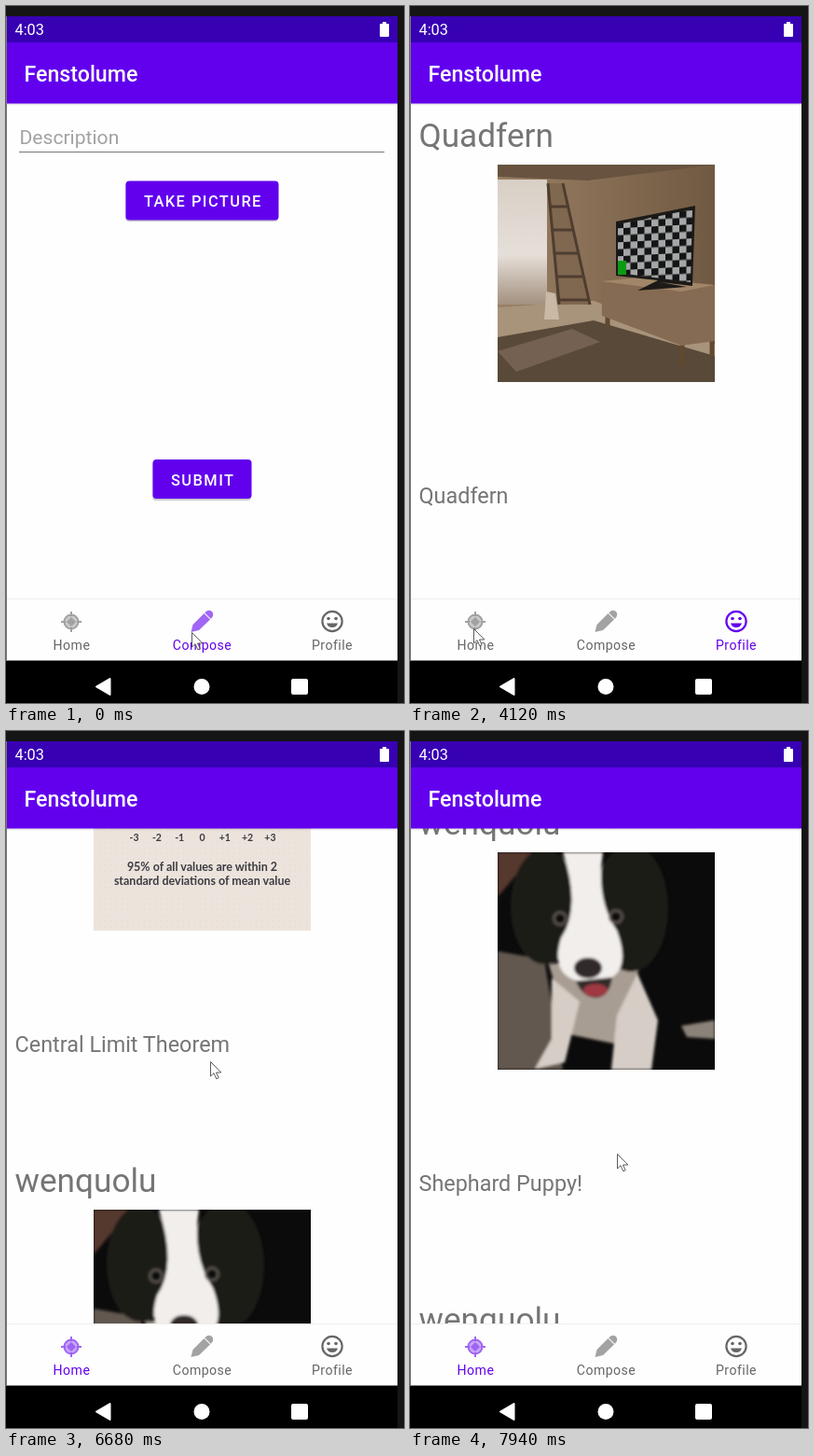
Recreate the animation shown at these times as an HTML page. Size 427 by 747 pixels, loop 8 s.

```html
<!DOCTYPE html>
<html lang="en">
<head>
<meta charset="utf-8">
<title>Photo sharing app</title>
<style>
html, body { margin: 0; width: 100%; height: 100%; overflow: hidden; background: #000; }
#stage { display: block; width: 100vw; height: 100vh; font-family: Roboto, sans-serif; }
.name { font-size: 35.2px; fill: #757575; }
.caption { font-size: 23.4px; fill: #757575; }
.button { font-size: 16.4px; font-weight: 500; letter-spacing: 1.46px; fill: #fff; }
.tab { color: #666; fill: currentColor; }
.tab.on { color: #6200ee; }
.tab text { font-size: 14.1px; letter-spacing: .46px; text-anchor: middle; }
.chart { font-family: Lato, sans-serif; font-weight: 700; text-anchor: middle; fill: #3b3b43; }
</style>
</head>
<body>
<svg id="stage" viewBox="0 0 427 747">
  <defs>
    <clipPath id="barClip"><path d="M1 636H420V701.5H1z"/></clipPath>
    <filter id="soft"><feGaussianBlur stdDeviation="1.6"/></filter>
    <linearGradient id="drop" x2="0" y2="1">
      <stop stop-opacity=".15"/><stop offset="1" stop-opacity="0"/>
    </linearGradient>
    <linearGradient id="daylight" x2="0" y2="1">
      <stop stop-color="#d8cfc5"/><stop offset=".6" stop-color="#e6dfd9"/><stop offset="1" stop-color="#a3917e"/>
    </linearGradient>
    <linearGradient id="wood"><stop stop-color="#9a8064"/><stop offset="1" stop-color="#705942"/></linearGradient>
    <pattern id="checks" width="15" height="15" patternUnits="userSpaceOnUse" patternTransform="skewY(-3)">
      <path fill="#a4a6a8" d="M0 0H15V15H0z"/>
      <path fill="#151515" d="M0 0H7.5V15H15V7.5H0z"/>
    </pattern>
    <pattern id="grid" width="6" height="6" patternUnits="userSpaceOnUse">
      <path fill="#e2d6cc" d="M0 0h1v1H0z"/>
    </pattern>

    <g id="room">
      <path fill="url(#wood)" d="M0 0H233V233H0z"/>
      <path fill="#67533f" d="M0 0H233L97 17 0 13z"/>
      <path fill="url(#daylight)" d="M0 16H53V150H0z"/>
      <path fill="#a8937b" d="M0 153 103 146 233 192V233H0z"/>
      <path fill="#594939" d="M0 185 103 167 233 205V233H0z"/>
      <path fill="#746151" d="M0 200 80 176 110 190 20 222z"/>
      <path fill="#80674f" d="M54 20H70L99 150H66z"/>
      <path id="shelves" fill="none" stroke="#4e3d30" stroke-width="3"/>
      <path fill="#c9b9a5" d="M50 166 52 136 62 138 66 166z"/>
      <path fill="none" stroke="#60492f" stroke-width="5" d="M118 159V176M198 190V216M230 186V206"/>
      <path fill="#866b54" d="M111 125 151 121 233 129V189L197 194 112 162z"/>
      <path fill="#a18668" d="M111 125 151 121 233 129 197 136z"/>
      <path fill="#1c1a18" d="M127 61 212 44 209 130 174 126 203 131 150 135 172 124 127 119z"/>
      <path fill="url(#checks)" d="M129 64 209 48 207 126 129 116z"/>
      <path fill="#0b9b13" d="M129 103H138V118H129z"/>
    </g>

    <g id="bell">
      <path fill="#ece4dc" d="M0 0H233V233H0z"/>
      <path fill="url(#grid)" d="M0 0H233V233H0z"/>
      <path id="area" fill="#3952a4"/>
      <path id="curve" fill="none" stroke="#3952a4"/>
      <path stroke="#dce0ee" d="M92 71V119M116.5 41V119M141 71V119"/>
      <path stroke="#45434a" stroke-width="1.4" d="M25 119H209"/>
      <g id="ticks" class="chart" font-size="10.5"></g>
      <text class="chart" x="116" y="32" font-size="12" style="fill:#3952a4">95%</text>
      <g class="chart" font-size="12.5">
        <text x="116.5" y="169">95% of all values are within 2</text>
        <text x="116.5" y="184">standard deviations of mean value</text>
      </g>
    </g>

    <g id="puppy">
      <path fill="#0c0b0b" d="M0 0H233V233H0z"/>
      <g filter="url(#soft)">
        <path fill="#54392d" d="M0 0H40L0 48z"/>
        <path fill="#62594f" d="M0 106 50 115 70 233H0z"/>
        <path fill="#8b8279" d="M197 186 233 180V200L203 198z"/>
        <path fill="#a89d92" d="M55 120 150 110 152 190 125 205 76 195z"/>
        <path fill="#d6cec6" d="M58 135 88 160 72 225 40 232 58 200zM150 130 128 175 122 233H165L172 180z"/>
        <ellipse cx="50" cy="58" rx="36" ry="62" fill="#1d1a18"/>
        <ellipse cx="143" cy="60" rx="40" ry="68" fill="#1d1a18"/>
        <path fill="#f1eeeb" d="M70 0H113Q105 50 128 84 148 138 100 140 54 138 68 92 90 60 70 0z"/>
        <g fill="#57504a"><circle cx="67" cy="71" r="8"/><circle cx="127" cy="69" r="8"/></g>
        <g fill="#080808"><circle cx="67" cy="71" r="5"/><circle cx="127" cy="69" r="5"/></g>
        <ellipse cx="97" cy="124" rx="15" ry="11" fill="#302a2a"/>
        <path fill="#302a2a" d="M84 138 123 134Q120 156 104 156 90 154 84 138z"/>
        <ellipse cx="105" cy="148" rx="13" ry="7" fill="#a03942"/>
      </g>
    </g>
  </defs>

  <path fill="#fefefe" d="M0 104H420V701H0z"/>
  <g id="compose">
    <text x="14.5" y="148" font-size="21.1" fill="#a2a2a2">Description</text>
    <path stroke="#777" d="M14 156.5H406"/>
    <g fill="#0003"><rect x="128" y="189" width="164" height="42" rx="4"/><rect x="157" y="488" width="106" height="42" rx="4"/></g>
    <g fill="#6200ee"><rect x="128.5" y="187.5" width="164" height="42" rx="4"/><rect x="157.5" y="486" width="106" height="42" rx="4"/></g>
    <text class="button" x="148" y="215">TAKE PICTURE</text>
    <text class="button" x="177" y="513.5">SUBMIT</text>
  </g>
  <g id="profile"></g>
  <g id="home"></g>

  <path fill="#151515" d="M0 0H427V747H420V11H0z"/>
  <path fill="#3700b3" d="M0 11H420V39H0z"/>
  <path fill="url(#drop)" d="M0 104H420V107H0z"/>
  <path fill="#6200ee" d="M0 39H420V104.400H0z"/>
  <text x="9.5" y="31" font-size="16.3" fill="#fff">4:03</text>
  <path fill="#fff" d="M404 17h4v2h2q1 0 1 1v12q0 1-1 1h-8q-1 0-1-1V20q0-1 1-1h2z"/>
  <text x="19.5" y="81" font-size="23.2" font-weight="500" fill="#fff">Fenstolume</text>

  <path fill="#fefefe" d="M0 636H420V702H0z"/>
  <path stroke="#eee" d="M0 635.5H420"/>
  <circle id="ripple" cy="668" fill="#d6d6d6" clip-path="url(#barClip)"/>
  <g class="tab" id="homeTab">
    <g transform="translate(70 660)">
      <g opacity=".6">
        <circle r="7.5" fill="none" stroke="currentColor" stroke-width="2"/>
        <path stroke="currentColor" stroke-width="2" d="M0-11V-6M0 6V11M-11 0H-6M6 0H11"/>
      </g>
      <circle r="6.5" opacity=".35"/>
      <path opacity=".4" d="M0-5 5 0 0 5-5 0z"/>
    </g>
    <text x="70.5" y="690">Home</text>
  </g>
  <g class="tab" id="composeTab">
    <path opacity=".6" d="M198.5 671 200.500 663 212.500 651 219 657.500 207 669zM213.200 650.300 215 648.700Q218 646.500 221 649 223.500 652 221 655.500L219.700 656.800z"/>
    <text x="210.5" y="690">Compose</text>
  </g>
  <g class="tab" id="profileTab">
    <circle cx="350" cy="659.5" r="10.6" fill="none" stroke="currentColor" stroke-width="2.2"/>
    <circle cx="346" cy="656.5" r="1.8"/><circle cx="354" cy="656.5" r="1.8"/>
    <path d="M344 661.5H356Q354.500 666 350 666T344 661.500z"/>
    <text x="350" y="690">Profile</text>
  </g>

  <path d="M0 701.5H420V747H0z"/>
  <path stroke="#777" d="M.5 11V701.5"/>
  <path fill="#fff" stroke="#fff" stroke-linejoin="round" stroke-width="2" d="M97 729.500 111.500 721V738z"/>
  <circle cx="210" cy="729.5" r="8.5" fill="#fff"/>
  <rect x="306" y="721" width="18" height="17" rx="2" fill="#fff"/>
  <path id="cursor" fill="#fff" stroke="#333" stroke-width=".8" d="M.5.5V16L4 12.700 6.800 18.800 9.200 17.700 6.500 12H11.800z"/>
</svg>
<script>
const $ = id => document.getElementById(id);
const LOOP = 8000, FRAME = 120, PITCH = 532;

const post = (name, caption, photo, row = 0) => `<g transform="translate(0 ${row * PITCH})">
  <text class="name" x="9.5" y="151">${name}</text>
  <svg x="94" y="170" width="233" height="233"><use href="#${photo}"/></svg>
  <text class="caption" x="9.5" y="533">${caption}</text></g>`;

$('profile').innerHTML = post('Quadfern', 'Quadfern', 'room');
$('home').innerHTML = post('Heku', 'Central Limit Theorem', 'bell') +
  [1, 2].map(row => post('wenquolu', 'Shephard Puppy!', 'puppy', row)).join('');

let shelves = 'M54 20 66 150M70 20 99 150';
for (let i = 0; i < 5; i++) shelves += `M${57 + i * 2.5} ${45 + i * 25}h${18 + i * 3}`;
$('shelves').setAttribute('d', shelves);

// Normal curve, in units of one standard deviation
const MEAN = 116.5, UNIT = 24.3;
function bell(from, to) {
  const points = [];
  for (let z = from; z <= to + .01; z += .1)
    points.push(`${MEAN + z * UNIT} ${119 - 78 * Math.exp(-z * z / 2)}`);
  return 'M' + points.join('L');
}
$('curve').setAttribute('d', bell(-3.1, 3.1));
$('area').setAttribute('d', `${bell(-2, 2)}V119H${MEAN - 2 * UNIT}z`);
for (let z = -3; z <= 3; z++) {
  const x = MEAN + z * UNIT;
  $('ticks').innerHTML += `<path stroke="#45434a" d="M${x} 119v4"/><text x="${x}" y="137">${z > 0 ? '+' + z : z}</text>`;
}

// Each move: start time, number of steps, where it ends
const pointer = [
  [0, 1, 199, 671], [550, 3, 378, 669], [1080, 1, 372, 671], [1600, 4, 70, 682],
  [2110, 2, 333, 679], [3610, 4, 72, 668], [4120, 1, 68, 667], [5250, 2, 229, 459],
  [5650, 3, 224, 553], [6140, 2, 219, 472], [6410, 2, 219, 354], [7430, 2, 222, 560],
  [7700, 2, 222, 453]
];
const flings = [[0, 1, 0], [6410, 8, 310], [7700, 3, 572]];
const taps = [
  { tab: 'compose', press: -LOOP, open: 0, load: 0, x: 210 },
  { tab: 'profile', press: 2480, open: 2600, load: 2750, x: 350 },
  { tab: 'home', press: 4820, open: 4950, load: 5250, x: 70 }
];

const linear = p => p;
const easeOut = p => 1 - (1 - p) ** 2;

function travel(moves, t, ease) {
  const i = moves.findLastIndex(([start]) => start <= t);
  const [start, steps, ...end] = moves[i];
  const from = moves[Math.max(i - 1, 0)].slice(2);
  const p = ease(Math.min(1, (Math.floor((t - start) / FRAME) + 1) / steps));
  return end.map((v, k) => from[k] + (v - from[k]) * p);
}

function draw(t) {
  const [x, y] = travel(pointer, t, linear);
  const [offset] = travel(flings, t, easeOut);
  const active = taps.findLast(tap => tap.open <= t);
  const pressed = taps.findLast(tap => tap.press <= t);
  const age = t - pressed.press;

  for (const { tab, load } of taps) {
    const on = tab === active.tab;
    $(tab).style.display = on && t >= load ? '' : 'none';
    $(tab + 'Tab').classList.toggle('on', on);
  }
  $('home').setAttribute('transform', `translate(0 ${-offset})`);
  $('cursor').setAttribute('transform', `translate(${x} ${y})`);
  $('ripple').setAttribute('cx', pressed.x);
  $('ripple').setAttribute('r', age >= 270 ? 0 : t < pressed.open ? 45 : 77);
}

const start = performance.now();
function frame() {
  draw((performance.now() - start) % LOOP);
  requestAnimationFrame(frame);
}
frame();
</script>
</body>
</html>
```
